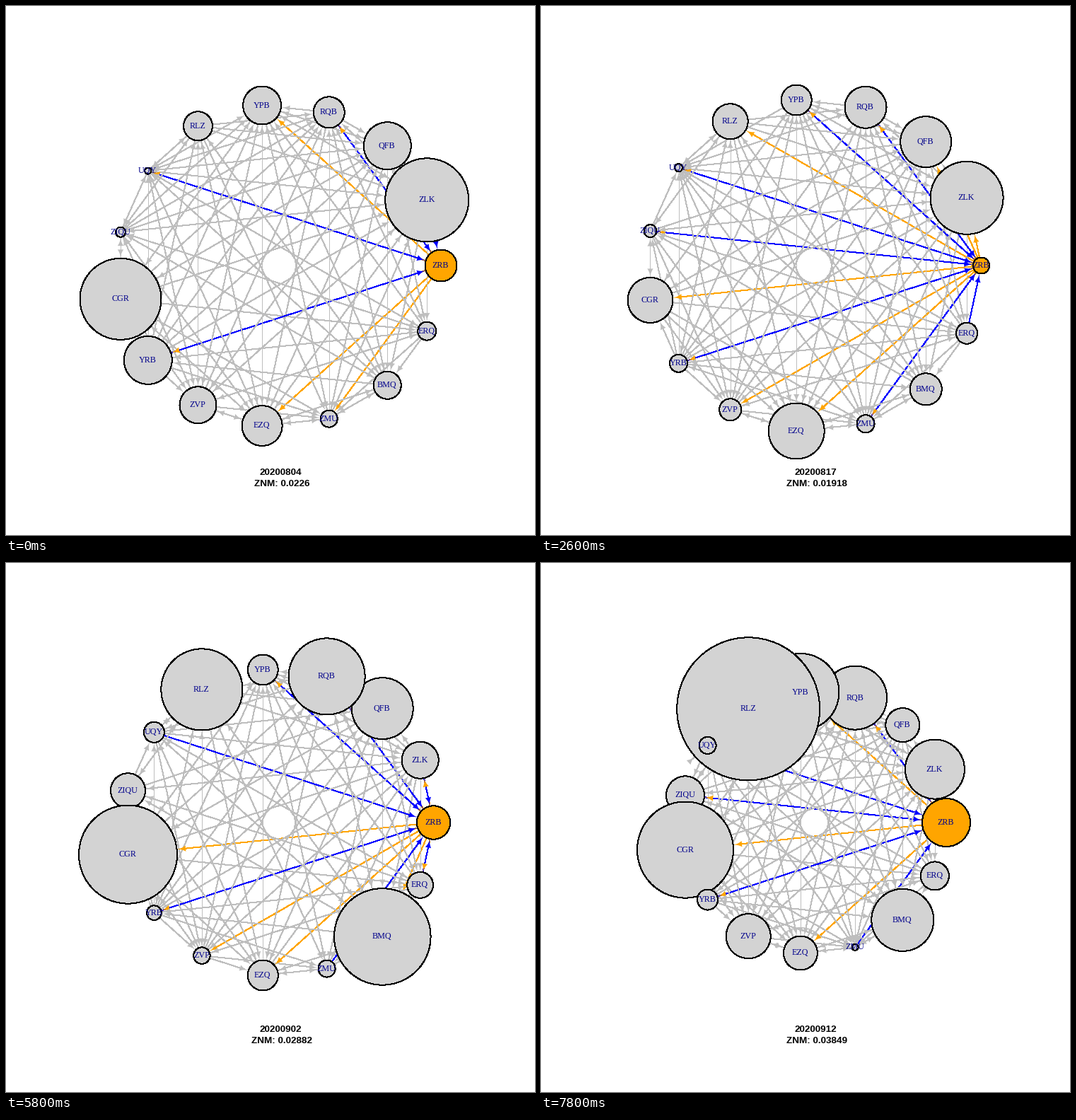
A matplotlib script for the animation above (8 s loop, 748 by 748 pixels).

```python
import numpy as np
import matplotlib.pyplot as plt
from matplotlib.animation import FuncAnimation
from matplotlib.collections import LineCollection, PolyCollection
from matplotlib.patches import Circle

SIZE, DPI = 748, 88
PX = 72 / DPI
FRAMES, STEP_MS = 40, 200
CX, CY, REACH = 388.5, 367, 285.5
HEAD, HALF = 12.5, 4.2
GRAY, BLUE, ORANGE = "#bebebe", "#0000ff", "#ffa500"

NAMES = "ZRB ZLK QFB RQB YPB RLZ UQY ZIQU CGR YRB ZVP EZQ ZMU BMQ ERQ".split()
N = len(NAMES)

# Known days, their index values and node radii (one row per day)
DAYS = [0, 5, 13, 19, 25, 32, 39]
INDEX = [0.0226, 0.02571, 0.01918, 0.02624, 0.02297, 0.03321, 0.03849]
RADII = [
    [22.5, 59, 33.5, 22, 27, 20.5, 4.5, 7, 57.5, 34, 26, 28.5, 12, 19.5, 13],
    [38, 48.5, 30.5, 51, 24.5, 35.5, 6.5, 6, 63.5, 11.5, 13.5, 42, 10, 36, 14],
    [11.5, 51.5, 36, 29.5, 21.5, 25, 5.5, 9, 32, 12.5, 15.5, 39.5, 12.5, 22.5, 15],
    [28, 42, 33.5, 30.5, 22.5, 27, 7, 38.5, 30.5, 18, 12, 11, 8, 18.5, 34.5],
    [28.5, 28, 56, 32, 22, 23, 14.5, 36, 27.5, 10, 10, 27.5, 12, 40, 31],
    [20, 24.5, 34, 30, 21, 83.5, 14.5, 16, 20, 10.5, 13, 17, 12, 89.5, 9],
    [34, 42, 24, 45, 54.5, 101, 12, 27, 68, 14.5, 31.5, 24, 4.5, 44, 20],
]
# Short swells between the known days
SWELLS = {
    "RQB": [(6, 55), (9, 100), (17, 46), (27, 70)],
    "ZIQU": [(22, 52)],
    "CGR": [(30, 80)],
    "YPB": [(36, 96)],
}
# Ties of the highlighted node: outgoing, incoming
TIES = [
    ("RQB YPB UQY YRB EZQ ZMU", "ZLK RQB UQY YRB"),
    ("YPB UQY YRB ZVP EZQ", "YPB UQY YRB ZMU"),
    ("ZLK QFB RQB YPB RLZ UQY ZIQU CGR YRB ZVP EZQ ZMU",
     "RQB YPB UQY ZIQU YRB ZMU ERQ"),
    ("ZLK RQB YPB UQY ZIQU YRB ZVP EZQ ERQ", "RQB YPB UQY YRB ZVP ZMU"),
    ("ZLK RQB YPB UQY YRB ZVP EZQ BMQ ERQ", "ZLK RQB YPB UQY YRB ZMU"),
    ("ZLK RQB YPB CGR YRB ZVP EZQ BMQ ERQ",
     "ZLK RQB YPB UQY ZIQU YRB ZMU ERQ"),
    ("RQB YPB ZIQU CGR YRB EZQ", "RQB UQY ZIQU YRB ZMU"),
]
BUSY = "UQY ZIQU YRB ZVP EZQ ZMU ERQ".split()

# Circular layout, stretched to fill -1..1 both ways
angle = 2 * np.pi * np.arange(N) / N
ux, uy = np.cos(angle), np.sin(angle)
ux = 2 * (ux - ux.min()) / np.ptp(ux) - 1
uy = uy / uy.max()

rng = np.random.default_rng(7)
base = rng.random((N, N))
flip = rng.random((len(DAYS), 2, N))
pull = np.array([0.07 if n in BUSY else 0 for n in NAMES])
gap = np.abs(np.subtract.outer(np.arange(N), np.arange(N)))
far = np.where((gap == 7) | (gap == 8), 0.12, 0)


def radius_track(j):
    points = list(zip(DAYS, [row[j] for row in RADII]))
    points = sorted(points + SWELLS.get(NAMES[j], []))
    return np.interp(np.arange(FRAMES), *zip(*points))


def tie_mask(k):
    return np.array([[n in side.split() for n in NAMES] for side in TIES[k]])


tracks = np.array([radius_track(j) for j in range(N)]).T
masks = [tie_mask(k) for k in range(len(DAYS))]


def adjacency(day):
    daily = np.random.default_rng(100 + day).random((N, N))
    adj = 0.78 * base + 0.22 * daily + pull + far > 0.46
    np.fill_diagonal(adj, False)
    k = min(np.searchsorted(DAYS, day, side="right") - 1, len(DAYS) - 2)
    part = (day - DAYS[k]) / (DAYS[k + 1] - DAYS[k])
    adj[0], adj[:, 0] = np.where(flip[k] < part, masks[k + 1], masks[k])
    return adj


# Arrow head with slightly hollow sides, tip at the origin
back = np.sqrt(np.linspace(0, 1, 7))
head_x = -HEAD * np.concatenate([back[::-1], back])
head_y = HALF * np.concatenate([-back[::-1] ** 2, back ** 2])


def edge_shapes(day, pos, rad):
    lines, heads, colors = [], [], []
    for a, b in np.argwhere(adjacency(day)):
        d = pos[b] - pos[a]
        d = d / np.hypot(*d)
        tip = pos[b] - d * rad[b]
        lines.append([pos[a] + d * rad[a], tip - d * HEAD * 0.5])
        side = np.array([-d[1], d[0]])
        heads.append(tip + np.outer(head_x, d) + np.outer(head_y, side))
        colors.append(ORANGE if a == 0 else BLUE if b == 0 else GRAY)
    return lines, heads, colors


fig = plt.figure(figsize=(SIZE / DPI, SIZE / DPI), dpi=DPI, facecolor="white")
ax = fig.add_axes([0, 0, 1, 1])
ax.set_xlim(0, SIZE)
ax.set_ylim(SIZE, 0)
ax.axis("off")

segments = LineCollection([], linewidths=PX, antialiaseds=False, zorder=1)
arrows = PolyCollection([], linewidths=0, zorder=2)
ax.add_collection(segments, autolim=False)
ax.add_collection(arrows, autolim=False)

nodes, labels = [], []
for j, name in enumerate(NAMES):
    fill = ORANGE if j == 0 else "#d3d3d3"
    nodes.append(ax.add_patch(Circle((0, 0), 1, fc=fill, ec="black", lw=PX,
                                     antialiased=False, zorder=3 + j * 0.01)))
    labels.append(ax.text(0, 0, name, family="Liberation Serif",
                          size=12.2 * PX, color="#00008b", ha="center",
                          va="baseline", zorder=4))


def caption(x, y):
    return ax.text(x, y, "", family="Liberation Sans", weight="bold",
                   size=13.5 * PX, ha="center", va="baseline", zorder=5)


date_text, index_text = caption(388.5, 663), caption(390, 679)


def update(day):
    rad = tracks[day]
    half = REACH - rad.max()
    pos = np.column_stack([CX + half * ux, CY - half * uy])
    lines, heads, colors = edge_shapes(day, pos, rad)
    segments.set_segments(lines)
    segments.set_color(colors)
    arrows.set_verts(heads)
    arrows.set_facecolor(colors)
    for node, label, p, r in zip(nodes, labels, pos, rad):
        node.center = p
        node.radius = r
        label.set_position((p[0] - 0.5, p[1] + 3))
    date = 804 + day if day < 28 else 901 + day - 28
    date_text.set_text(f"2020{date:04d}")
    value = round(float(np.interp(day, DAYS, INDEX)), 5)
    index_text.set_text(f"ZNM: {value}")
    return [segments, arrows, *nodes, *labels, date_text, index_text]


anim = FuncAnimation(fig, update, frames=FRAMES, interval=STEP_MS,
                     repeat=True, repeat_delay=0, blit=False)
plt.show()
```
